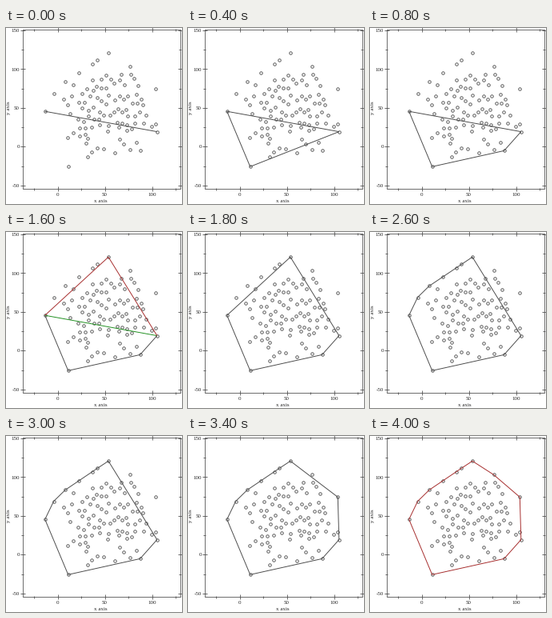
Animation, 220 px wide and 220 px high, one loop 6 s. Source, as a matplotlib script:

```python
import random

import matplotlib.pyplot as plt
from matplotlib.animation import FuncAnimation
from matplotlib.collections import LineCollection

SIZE, DPI, STEP_MS, STEPS = 220, 100, 200, 30
PX = 72 / DPI
INK, RED, GREEN = "#4a4a4a", "#a52a2a", "#1f8f1f"
LEFT, RIGHT, TOP, BOTTOM = 20.5, 217.5, 2.5, 201.5
UPPER_START, FINISHED = 8, 20

# Outline of the cloud in pixels, y pointing down
OUTLINE = [(48.7, 104.2), (59.6, 81.6), (74, 67.5), (91, 56.3), (107.5, 45.2),
           (114, 40.5), (128, 31.3), (154.6, 48.4), (187.3, 76.4),
           (187.3, 120), (188.8, 129.6), (167.6, 153.4), (77.7, 173.3)]


def side_distance(start, end, point):
    """Signed distance of a point from a line, positive on its left on screen."""
    (ax, ay), (bx, by), (px, py) = start, end, point
    dx, dy = bx - ax, by - ay
    return (dy * (px - ax) - dx * (py - ay)) / (dx * dx + dy * dy) ** 0.5


def make_cloud(count, gap=6, margin=4):
    """Add well separated, normally distributed points inside the outline."""
    rng = random.Random(12)
    sides = list(zip(OUTLINE, OUTLINE[1:] + OUTLINE[:1]))
    points = list(OUTLINE)
    while len(points) < count:
        x, y = rng.gauss(122, 29), rng.gauss(100, 28)
        inside = all(side_distance(a, b, (x, y)) < -margin for a, b in sides)
        if inside and all((x - a) ** 2 + (y - b) ** 2 > gap ** 2
                          for a, b in points):
            points.append((x, y))
    return points


def quickhull_states(points):
    """Return (step, edges) pairs; each edge is (start, end, colour)."""
    west, east = min(points), max(points)
    edges = [(west, east)]
    states = []

    def show(step, changed=()):
        black = [(*e, INK) for e in edges]
        states.append((step, black + list(changed)))

    def split(step, start, end, turn, keep=False):
        """Split an edge at its farthest outside point; return the next step."""
        far = max(points, key=lambda p: turn * side_distance(start, end, p))
        if turn * side_distance(start, end, far) < 0.01:
            return step
        edge, halves = (start, end), [(start, far), (far, end)]
        edges.remove(edge)
        show(step, [(*edge, GREEN)] + [(*h, RED) for h in halves])
        edges.extend(halves + ([edge] if keep else []))
        show(step + 1)
        step = split(step + 2, start, far, turn)
        return split(step, far, end, turn)

    show(0)
    split(1, west, east, -1, keep=True)
    split(UPPER_START, west, east, 1)
    states.append((FINISHED, [(*e, RED) for e in edges]))
    return states


def draw_axes(ax):
    style = dict(color=INK, lw=0.8 * PX, solid_capstyle="butt")
    font = dict(family="Liberation Serif", fontsize=7 * PX, color="#222222")
    ax.plot([LEFT, RIGHT, RIGHT, LEFT, LEFT],
            [TOP, TOP, BOTTOM, BOTTOM, TOP], **style)
    for value in range(-25, 126, 25):
        x = 64.5 + 1.18 * value
        size = 1.5 if value % 50 else 3
        for y in (TOP, BOTTOM):
            ax.plot([x, x], [y - size, y + size], **style)
        if value % 50 == 0:
            ax.text(x, 208.5, str(value), ha="center",
                    va="center_baseline", **font)
    for value in range(-50, 151, 25):
        y = 148.5 - 0.97 * value
        size = 1.5 if value % 50 else 3
        for x in (LEFT, RIGHT):
            ax.plot([x - size, x + size], [y, y], **style)
        if value % 50 == 0:
            ax.text(17, y, str(value), ha="right",
                    va="center_baseline", **font)
    ax.text(118.5, 216, "x axis", ha="center", va="center", **font)
    ax.text(3.8, 100, "y axis", ha="center", va="center", rotation=90, **font)


fig = plt.figure(figsize=(SIZE / DPI, SIZE / DPI), dpi=DPI, facecolor="white")
ax = fig.add_axes([0, 0, 1, 1])
ax.set(xlim=(0, SIZE), ylim=(SIZE, 0))
ax.axis("off")
draw_axes(ax)

cloud = make_cloud(100)
ax.plot(*zip(*cloud), "o", ms=3.5 * PX, mfc="none", mec=INK, mew=0.85 * PX)
lines = ax.add_collection(LineCollection([], linewidths=0.95 * PX, zorder=3),
                          autolim=False)
STATES = quickhull_states(cloud)


def update(step):
    edges = [shown for start, shown in STATES if start <= step][-1]
    lines.set_segments([(a, b) for a, b, _ in edges])
    lines.set_color([colour for *_, colour in edges])
    return [lines]


anim = FuncAnimation(fig, update, frames=STEPS, interval=STEP_MS,
                     repeat=True, repeat_delay=0)
plt.show()
```
